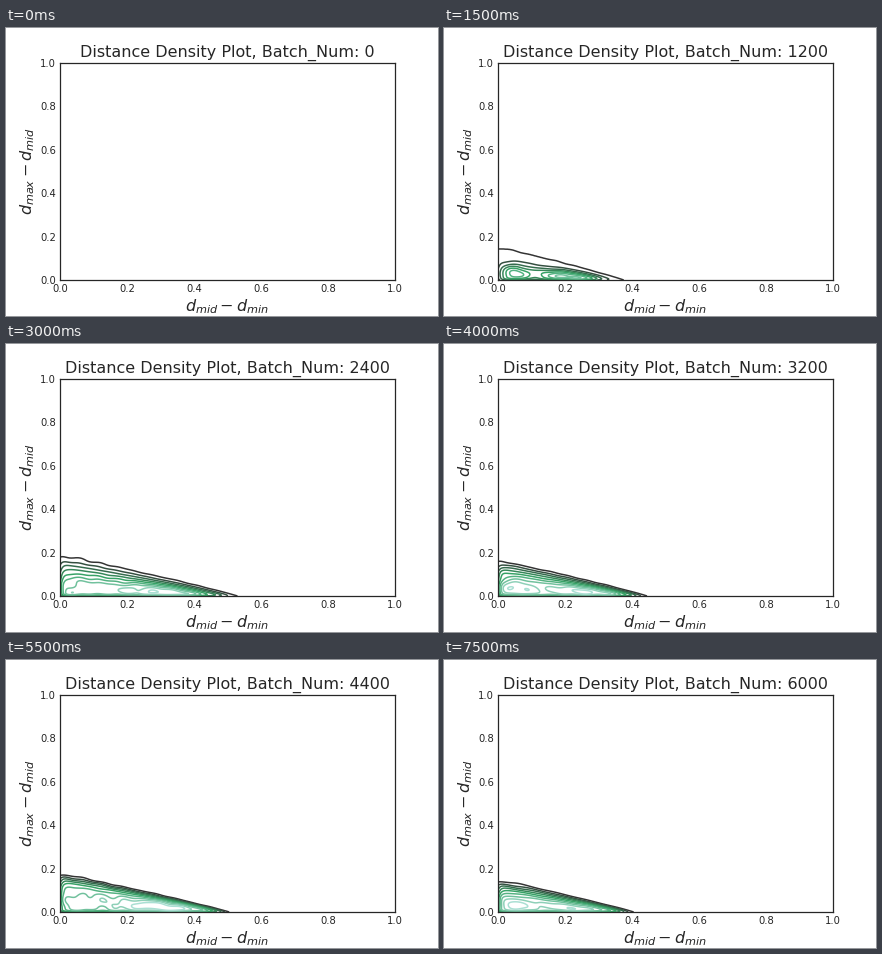
A matplotlib script for the animation above (8 s loop, 432 by 288 pixels).

```python
import numpy as np
import matplotlib.pyplot as plt
from matplotlib.animation import FuncAnimation
from matplotlib.colors import LinearSegmentedColormap

FRAMES, INTERVAL, STEP = 16, 500, 400
LEVELS = np.arange(1, 10)
INK = "0.15"

# Key steps of the run and how the cloud looks at each of them
KEYS = [1, 3, 6, 8, 10, 13, 15]
LENGTH = [.31, .376, .53, .445, .553, .41, .405]
PLATEAU = [3, 3, 7, 7.2, 5.8, 9, 7.6]
EDGE = [.7, .7, .42, .32, .2, .18, .3]
NEAR = [4, 5, 1.2, 2, .5, .4, 2]
FAR = [6, 7.5, 3, 2.5, 4.5, 0, 1.5]

plt.rcParams.update({"font.family": "DejaVu Sans", "text.color": INK,
                     "axes.labelcolor": INK, "axes.edgecolor": INK,
                     "xtick.color": INK, "ytick.color": INK})
cmap = LinearSegmentedColormap.from_list("d", ["#333333", "#37a266", "#aadfd3"])
X, Y = np.meshgrid(np.linspace(0, 0.62, 320), np.linspace(0, 0.24, 240))


def ripple(i):
    rng = np.random.default_rng(40 + i)
    total = np.zeros_like(X)
    for _ in range(8):
        fx, fy = rng.uniform(30, 120, 2) * rng.choice([-1, 1], 2)
        total += np.sin(fx * X + fy * Y + rng.uniform(0, 2 * np.pi))
    return total / 2


def bump(da, db):
    return np.exp(-da ** 2 - db ** 2)


def density(i):
    """Triangular cloud that is thin at the axes and dense inside."""
    length, plateau, edge, near, far = (
        np.interp(i, KEYS, v) for v in (LENGTH, PLATEAU, EDGE, NEAR, FAR))
    a, b = X / length, Y / (0.06 + 0.25 * length - 0.001 * i)
    noise = ripple(i)

    height = (plateau + 0.25 * noise
              + near * bump((a - .13) / .12, (b - .24) / .25)
              + far * bump((a - .6) / .28, (b - .13 + .35 * (a - .6)) / .2))
    # Distance from the corner: 1 on the outer contour
    u = (a ** 1.06 + b ** 1.06) ** (1 / 1.06)
    u += 0.05 * b * np.exp(-X / 0.012) + 0.012 * noise * b
    width = edge * (0.3 + 0.7 * b / (a + b + 1e-9))
    rise = 1 - np.exp(-(np.clip(1 - u, 0, None) / width) ** 1.3)
    sides = (1 + np.tanh(X / 0.012)) * (1 + np.tanh(Y / 0.007)) / 4
    return np.where(u < 1, 1 + (height - 1) * rise * sides, 1 - 8 * (u - 1))


fig = plt.figure(figsize=(6, 4), dpi=72, facecolor="white")
ax = fig.add_axes([0.125, 0.125, 0.775, 0.755])


def draw(i):
    ax.clear()
    if i:
        ax.contour(X, Y, density(i), levels=LEVELS, cmap=cmap, linewidths=1.5)
    ax.set(xlim=(0, 1), ylim=(0, 1))
    ax.tick_params(length=0, pad=4, labelsize=10)
    for spine in ax.spines.values():
        spine.set_linewidth(1.25)
    ax.set_title(f"Distance Density Plot, Batch_Num: {i * STEP}", fontsize=16, pad=6)
    ax.set_xlabel("$d_{mid}-d_{min}$", fontsize=16, labelpad=3)
    ax.set_ylabel("$d_{max}-d_{mid}$", fontsize=16, labelpad=3)


anim = FuncAnimation(fig, draw, frames=FRAMES, interval=INTERVAL,
                     init_func=lambda: None, repeat=True, repeat_delay=0)
plt.show()
```
